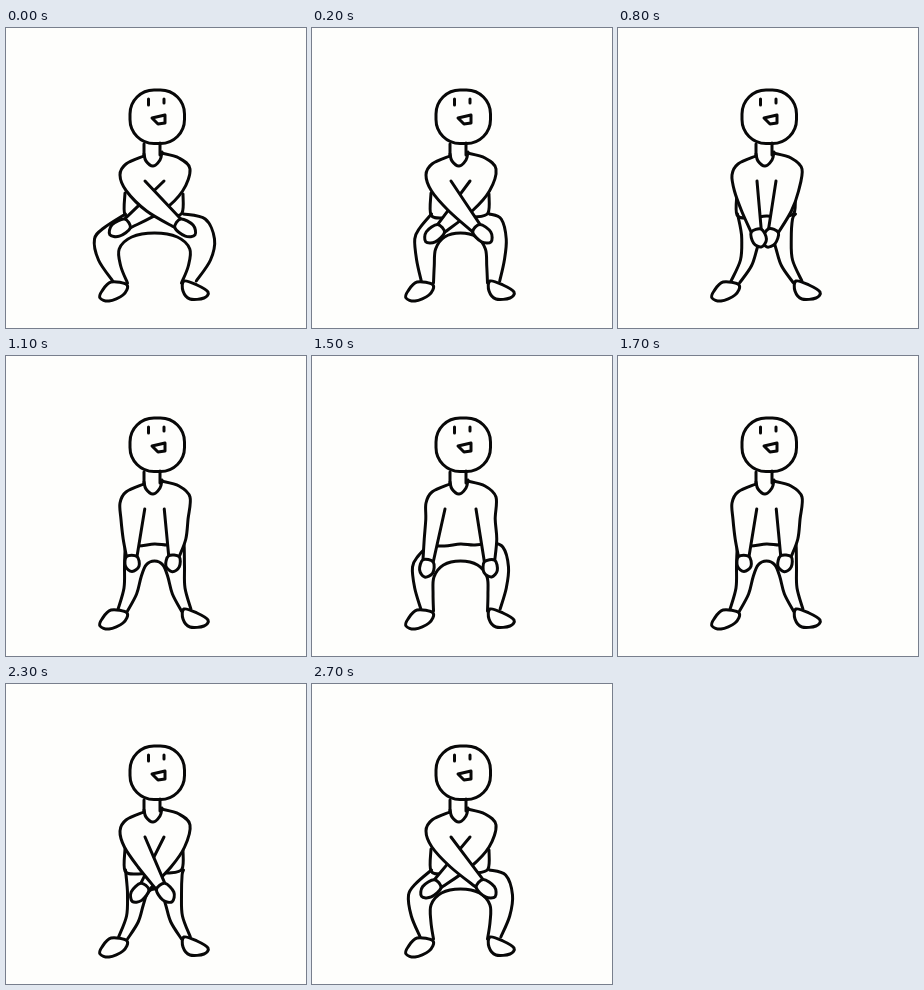
Write an HTML page with a canvas that moves like this. It is 300 by 300 pixels and loops after 2800 ms.

```html
<!DOCTYPE html>
<html lang="en">
<head>
<meta charset="utf-8">
<title>Knee dance</title>
<style>
html, body { margin: 0; width: 100%; height: 100%; overflow: hidden; background: #fefefc; }
canvas { display: block; }
</style>
</head>
<body>
<canvas id="stage" width="300" height="300"></canvas>
<script>
const ctx = document.getElementById('stage').getContext('2d');
const PAPER = '#fefefc', INK = '#080808';
const STEP = 100, STEPS = 28;
const MID = 148.5; // mirror axis of the body

// spread: knees from the axis; reach: hands past the axis (positive = arms crossed).
// The second half of the loop runs back through the same poses.
const poses = [
  { at: 0, spread: 60, reach: 34, handY: 201 },
  { at: 1, spread: 52, reach: 29, handY: 206 },
  { at: 5, spread: 27, reach: 14, handY: 210 },
  { at: 9, spread: 24, reach: -12, handY: 211 },
  { at: 11, spread: 30, reach: -20.5, handY: 208 },
  { at: 13, spread: 48, reach: -32, handY: 213 },
  { at: 14, spread: 53, reach: -36, handY: 214 }
];

const lerp = (a, b, u) => a + (b - a) * u;

function poseAt(step) {
  const i = Math.max(1, poses.findIndex(p => p.at >= step));
  const a = poses[i - 1], b = poses[i], u = (step - a.at) / (b.at - a.at);
  const mix = key => lerp(a[key], b[key], u);
  return { spread: mix('spread'), reach: mix('reach'), handY: mix('handY') };
}

// Smooth curve through all points.
function curve(points, closed = false) {
  const n = points.length, path = new Path2D();
  const at = i => points[closed ? (i + n) % n : Math.max(0, Math.min(n - 1, i))];
  path.moveTo(...at(0));
  for (let i = 0; i < (closed ? n : n - 1); i++) {
    const [p, q, r, t] = [at(i - 1), at(i), at(i + 1), at(i + 2)];
    path.bezierCurveTo(q[0] + (r[0] - p[0]) / 6, q[1] + (r[1] - p[1]) / 6,
                       r[0] - (t[0] - q[0]) / 6, r[1] - (t[1] - q[1]) / 6, ...r);
  }
  if (closed) path.closePath();
  return path;
}

const line = (...points) => ctx.stroke(curve(points));

function shape(path) {
  ctx.fill(path);
  ctx.stroke(path);
}

const blob = (...points) => shape(curve(points, true));

function mirrored(drawPart) {
  ctx.save();
  ctx.translate(2 * MID, 0);
  ctx.scale(-1, 1);
  drawPart();
  ctx.restore();
}

// Limbs are described for the left side of the stage.
function outerLeg(d, thighY) {
  const hip = MID - 29, knee = MID - d;
  line([hip, 186], [lerp(hip, knee, 0.7), thighY], [knee, 211],
       [MID - 5 - 0.85 * d, 232], [MID - 31 - 0.18 * d, 253]);
}

function innerLegs(d) {
  const half = [[27, 255], [2 + 0.53 * d, 238], [0.73 * d - 8.5, 221], [0.48 * d - 6, 209]];
  const left = half.map(([x, y]) => [MID - x, y]);
  const right = half.map(([x, y]) => [MID + x, y]).reverse();
  line(...left, [MID, 205], ...right);
}

function arm(shoulder, handX, handY, reach) {
  const angle = Math.atan2(handY - 163, handX - 126);
  const cos = Math.cos(angle), sin = Math.sin(angle);
  const length = 7.5 + 3.5 * Math.abs(cos);
  const onHand = (along, across) =>
    [handX + along * cos - across * sin, handY + along * sin + across * cos];

  const outer = [...shoulder, [117 + 0.1 * reach, 163], [126 + 0.43 * reach, 183], onHand(-length, 5.5)];
  const inner = [[139 + 0.5 * Math.min(0, reach + 20), 153], onHand(-length, -5)];
  ctx.beginPath();
  for (const p of [...outer.slice(1), ...inner.reverse()]) ctx.lineTo(...p);
  ctx.fill();
  line(...outer);
  line(...inner);
  blob(onHand(-length, 5.5), onHand(-length, -5), onHand(0.3 * length, -7),
       onHand(length, 0), onHand(0.3 * length, 6.5));
}

function drawHead() {
  const skull = new Path2D();
  skull.roundRect(124, 62, 54.5, 53.5, 24);
  shape(skull);
  line([142.5, 71], [142.5, 77]);
  line([158, 71], [158, 75]);
  ctx.stroke(new Path2D('M146 90L159 87L159 95L152 96Z'));
  line([138, 116], [138, 128]);
  line([154, 115], [154, 127]);
  line([138, 126], [140, 133], [147, 138], [154, 132], [156, 124]);
}

function draw({ spread, reach, handY }) {
  ctx.fillStyle = PAPER;
  ctx.fillRect(0, 0, 300, 300);
  ctx.strokeStyle = INK;
  ctx.lineWidth = 3;
  ctx.lineCap = ctx.lineJoin = 'round';

  outerLeg(spread, 200);
  mirrored(() => outerLeg(spread, 191));
  innerLegs(spread);
  blob([105, 254], [121, 257], [117, 267], [103, 273], [94, 270], [96, 263]);
  blob([178, 253], [191, 257], [202, 264], [198, 270], [184, 271], [177, 263]);

  line([119, 165], [119, 187], [132, 190], [MID, 188], [163, 189], [176, 185], [177, 166]);
  mirrored(() => arm([[142, 125], [124, 130], [113, 141]], MID + 2 + reach, handY, reach));
  arm([[138, 128], [120, 136], [114, 147]], MID - 2 + reach, handY, reach);
  drawHead();
}

function tick() {
  const step = Math.floor(performance.now() / STEP) % STEPS;
  draw(poseAt(Math.min(step, STEPS - step)));
  requestAnimationFrame(tick);
}
tick();
</script>
</body>
</html>
```
